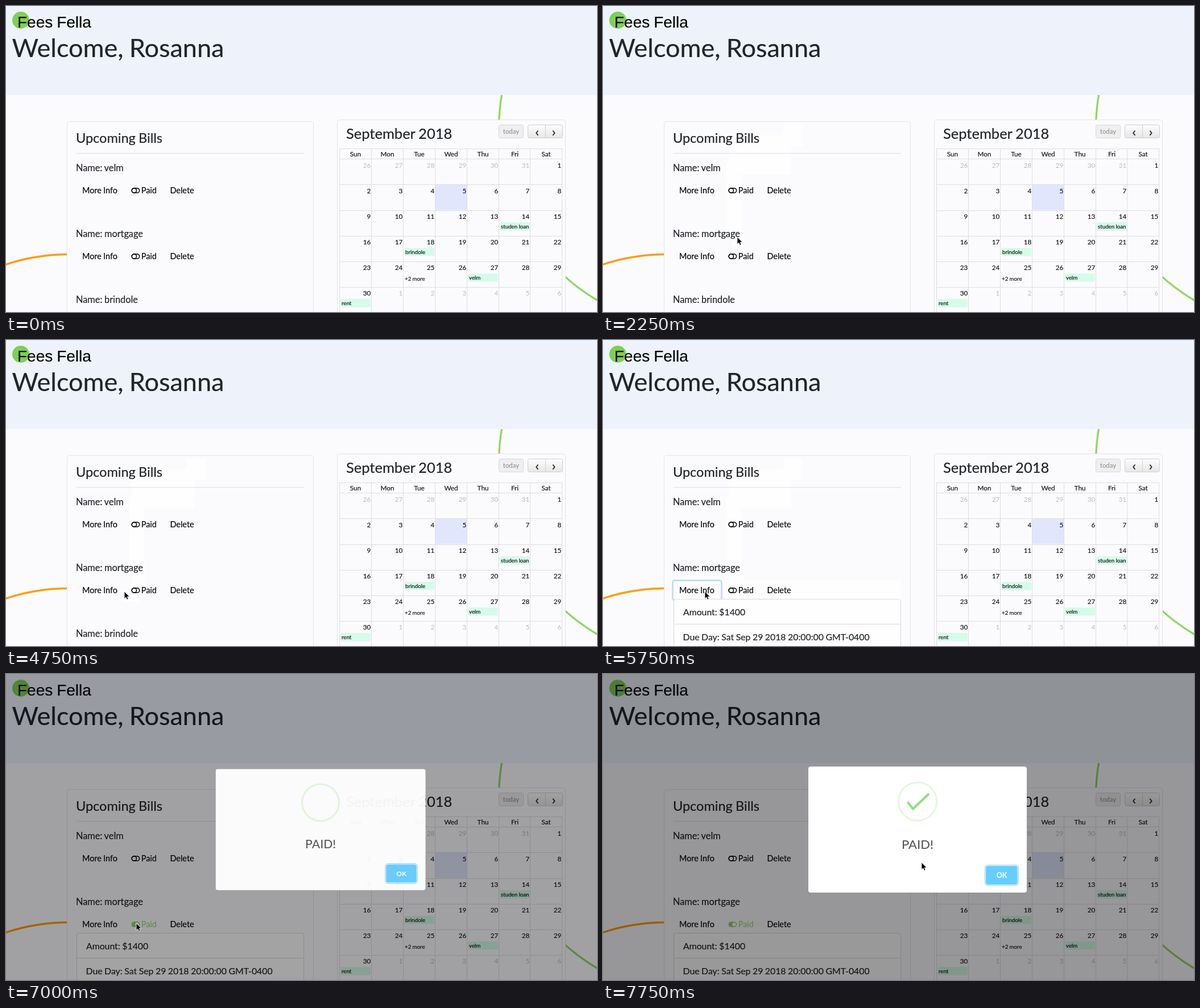
Animation of 1039 by 539 pixels, one loop 8000 ms. Source, as an HTML page:

```html
<!DOCTYPE html>
<html lang="en">
<head>
<meta charset="utf-8">
<title>Bill calendar</title>
<style>
  html, body { margin: 0; width: 100%; height: 100%; overflow: hidden; background: #fbfbfe; }
  svg { display: block; width: 1039px; height: 539px; }
  text { font-family: Lato, sans-serif; fill: #212529; stroke: #212529; stroke-width: .2; word-spacing: -.03em; }
  .brand { font: 28px "Liberation Sans", Arial, sans-serif; fill: #000; }
  .h1 { font-size: 45px; }
  .h2 { font-size: 23.5px; }
  .name { font-size: 16.3px; }
  .item { font-size: 15.8px; }
  .btn { font-size: 14.4px; fill: #000; }
  .title { font-size: 25.5px; }
  .head { font-size: 11.7px; fill: #111; text-anchor: middle; }
  .date { font-size: 11.7px; fill: #111; text-anchor: end; }
  .event { font-size: 9.75px; fill: #111; }
  .today { font-size: 11.4px; fill: #888; text-anchor: middle; }
  .paid { font-size: 22px; font-weight: 500; fill: #595959; text-anchor: middle; }
  .ok { font-size: 12.5px; font-weight: 700; fill: #fff; text-anchor: middle; }
  .other { fill: #bbb; }
  .other, .today, .paid, .ok, .on text { stroke: none; }
  .card { fill: #fbfbfe; stroke: #e4e4e7; }
  .line { fill: none; stroke: #dedee1; }
  .arc { fill: none; stroke-width: 3.3; }
  .on, .on text { fill: #8fd75f; }

  #cursor, #shade, #modal { animation: 8s step-end infinite; }
  #cursor { animation-name: move; }
  #shade { animation-name: shade; }
  #modal { animation-name: pop; transform-origin: 553.5px 274.3px; }

  @keyframes move {
    0% { transform: translate(339px, 212px); visibility: hidden; }
    6.25% { transform: translate(339px, 212px); visibility: visible; }
    9.375% { transform: translate(320px, 230px); }
    12.5% { transform: translate(223px, 280px); }
    15.625% { transform: translate(219px, 300px); }
    18.75% { transform: translate(231px, 397px); }
    28.125% { transform: translate(236px, 407px); }
    40.625% { transform: translate(225px, 434px); }
    43.75% { transform: translate(223px, 442px); }
    59.375% { transform: translate(208px, 443px); }
    62.5% { transform: translate(175px, 443px); }
    65.625% { transform: translate(173px, 442px); }
    71.875% { transform: translate(179px, 443px); }
    75% { transform: translate(230px, 439px); }
    81.25% { transform: translate(229px, 439px); }
    93.75% { transform: translate(554px, 329px); }
    96.875%, 100% { transform: translate(560px, 332px); visibility: visible; }
  }
  @keyframes shade {
    0% { opacity: 0; }
    87.5% { opacity: .36; }
    90.625%, 100% { opacity: .4; }
  }
  @keyframes pop {
    0% { visibility: hidden; }
    87.5% { visibility: visible; opacity: .955; transform: scale(.961); }
    90.625%, 100% { visibility: visible; opacity: 1; transform: none; }
  }
</style>
</head>
<body>
<svg viewBox="0 0 1039 539">
  <rect width="1039" height="539" fill="#fbfbfe"/>
  <circle class="arc" cx="1217" cy="216" r="350.5" stroke="#8fd75f"/>
  <circle class="arc" cx="110" cy="788" r="350.5" stroke="#ff9c0a"/>
  <rect width="1039" height="157" fill="#edf2fb"/>
  <circle cx="26" cy="25" r="15" fill="#7fd053"/>
  <text class="brand" x="20" y="38">Fees Fella</text>
  <text class="h1" x="10.5" y="90">Welcome, Rosanna</text>

  <rect class="card" x="107.5" y="203.5" width="433" height="360" rx="4"/>
  <g id="patches" fill="#fefefe"></g>
  <text class="h2" x="123" y="241">Upcoming Bills</text>
  <path class="line" d="M124 259.5H524"/>
  <g id="focus"></g>
  <g id="bills"></g>

  <g id="details">
    <rect x="124.5" y="456.5" width="399" height="120" rx="4" fill="#fefefe" stroke="#d8d8db"/>
    <path d="M124 500.5H524" stroke="#d8d8db"/>
    <text class="item" x="141" y="485">Amount: $1400</text>
    <text class="item" x="140.5" y="529">Due Day: Sat Sep 29 2018 20:00:00 GMT-0400</text>
  </g>
  <rect id="unrolled" x="122" y="536" width="404" height="3" fill="#fefefe"/>

  <rect class="card" x="582.5" y="200.5" width="401" height="360" rx="4"/>
  <text class="title" x="598" y="234">September 2018</text>
  <linearGradient id="face" x2="0" y2="1"><stop stop-color="#fdfdfd"/><stop offset="1" stop-color="#e6e6e6"/></linearGradient>
  <rect x="866.5" y="209.5" width="43" height="23" rx="3" fill="#efeff0" stroke="#d8d8d9"/>
  <text class="today" x="888" y="225">today</text>
  <rect x="917.5" y="209.5" width="61" height="23" rx="3" fill="url(#face)" stroke="#d0d0d0"/>
  <path d="M948.5 210V232" stroke="#d0d0d0"/>
  <path d="M935.5 219.5L932.2 223.7L935.5 228M961.3 219.5L964.6 223.7L961.3 228" fill="none" stroke="#333" stroke-width="1.9"/>
  <g id="calendar"></g>

  <rect id="shade" width="1039" height="539" opacity="0"/>
  <g id="modal">
    <rect x="361" y="163" width="384" height="222" rx="4" fill="#fff"/>
    <circle cx="553" cy="224.5" r="33.7" fill="none" stroke="#e6f7df" stroke-width="3.2"/>
    <g id="tick" fill="none" stroke="#90e07e" stroke-width="4.2"></g>
    <text class="paid" x="553" y="308">PAID!</text>
    <rect x="671.5" y="336.5" width="58.5" height="36" rx="5" fill="#fff" stroke="#a9daf6" stroke-width="1.6"/>
    <rect x="673" y="338" width="55.5" height="33" rx="4" fill="#66cefe"/>
    <text class="ok" x="701" y="359.2">OK</text>
  </g>
  <path id="cursor" d="M0 0V12.5L2.8 9.9L4.8 14.3L7 13.3L5.1 9.1H9Z" stroke="#fff" stroke-width=".8"/>
</svg>
<script>
  const LOOP = 8000;
  const $ = id => document.getElementById(id);
  const sheet = document.querySelector('style').sheet;
  let windows = 0;

  function add(parent, tag, attrs, text = '') {
    const el = document.createElementNS('http://www.w3.org/2000/svg', tag);
    for (const key in attrs) el.setAttribute(key, attrs[key]);
    el.textContent = text;
    return ($(parent) || parent).appendChild(el);
  }
  const label = (parent, cls, x, y, text) => add(parent, 'text', { class: cls, x, y }, text);

  // Keeps an element visible only between two times of the loop.
  function show(el, from, to = LOOP) {
    const name = 'w' + windows++;
    const pct = t => t / LOOP * 100 + '%';
    const off = '{visibility:hidden}';
    const end = to < LOOP ? pct(to) + off : '100%{visibility:visible}';
    const start = from > 0 ? '0%' + off : '';
    sheet.insertRule(`@keyframes ${name}{${start}${pct(from)}{visibility:visible}${end}}`, sheet.cssRules.length);
    el.style.animation = `${name} ${LOOP}ms step-end infinite`;
  }

  // Bills
  function paid(y, on) {
    const g = add('bills', 'g', on ? { class: 'on' } : {});
    if (on) {
      add(g, 'rect', { x: 220.5, y: y - 4.8, width: 14.8, height: 9.6, rx: 4.8 });
      add(g, 'circle', { cx: 230.6, cy: y, r: 3.3, fill: '#fbfbfe' });
    } else {
      const ring = { fill: 'none', stroke: '#000', 'stroke-width': 1.5 };
      add(g, 'rect', { x: 221.2, y: y - 4.1, width: 13.4, height: 8.2, rx: 4.1, ...ring });
      add(g, 'circle', { cx: 225.3, cy: y, r: 4.1, ...ring });
    }
    label(g, 'btn', 237.8, y + 5, 'Paid');
    return g;
  }
  ['velm', 'mortgage', 'brindole'].forEach((name, i) => {
    const y = 291 + 116 * i;
    label('bills', 'name', 123, y, 'Name: ' + name);
    if (i === 2) return;
    label('bills', 'btn', 134, y + 39, 'More Info');
    label('bills', 'btn', 288.5, y + 39, 'Delete');
    const off = paid(y + 34, false);
    if (i === 1) {
      show(off, 0, 7000);
      show(paid(y + 34, true), 7000);
    }
  });

  // Button focus
  const ring = (x, width, grow, stroke, from, to) => show(add('focus', 'rect', {
    x: x - grow / 2, y: 425 - grow / 2, width: width + grow, height: 32 + grow,
    rx: 4, fill: '#fefefe', stroke, 'stroke-width': grow
  }), from, to);
  ring(124, 83, 3, '#bfdeff', 5250, 6750);
  ring(124, 83, 1, '#c8dcf5', 6750, 7000);
  ring(209, 67, 1, '#e2ebf8', 6750, 7000);
  show($('details'), 5250);
  show($('unrolled'), 5250, 5500);

  // Brighter areas left behind by the pointer: time, left, top, right, bottom
  [
    [500, 336, 210, 351, 228],
    [750, 317, 209, 351, 247],
    [1000, 221, 228, 331, 297],
    [1250, 216, 278, 237, 317],
    [1500, 216, 298, 243, 412],
    [2250, 228, 395, 247, 424],
    [3250, 222, 404, 247, 451],
    [3500, 220, 431, 236, 459],
    [4750, 205, 441, 234, 461],
    [5000, 172, 441, 219, 461],
    [5250, 121, 422, 524, 539]
  ].forEach(([t, x, y, right, bottom]) =>
    show(add('patches', 'rect', { x, y, width: right - x, height: bottom - y }), t, 7000));

  // Calendar
  const crisp = v => Math.floor(v) + .5;
  const colX = c => crisp(586.5 + 55.9 * c);
  const rowY = r => crisp(269.8 + 45.15 * r);
  add('calendar', 'rect', { x: colX(3), y: rowY(1), width: 56, height: 45, fill: '#e1e6fc' });
  let grid = 'M586.5 251.5H978';
  for (let i = 0; i < 8; i++) grid += `M${colX(i)} 251V539`;
  for (let r = 0; r < 6; r++) grid += `M586.5 ${rowY(r)}H978`;
  add('calendar', 'path', { class: 'line', d: grid });
  ['Sun', 'Mon', 'Tue', 'Wed', 'Thu', 'Fri', 'Sat'].forEach((day, c) =>
    label('calendar', 'head', colX(c) + 28, 265, day));
  for (let i = 0; i < 42; i++) {
    const n = i - 5;
    const day = n < 1 ? n + 31 : n > 30 ? n - 30 : n;
    label('calendar', n === day ? 'date' : 'date other',
      colX(i % 7 + 1) - 1.2, 284.5 + 45.15 * Math.floor(i / 7), day);
  }
  function event(c, r, text) {
    const x = colX(c), y = 291 + 45 * r;
    add('calendar', 'rect', { x: x + 1.5, y, width: 53, height: 14.5, rx: 2, fill: '#d5fce9' });
    label('calendar', 'event', x + 3.5, y + 10.6, text);
  }
  event(5, 2, 'studen loan');
  event(2, 3, 'brindole');
  event(4, 4, 'velm');
  event(0, 5, 'rent');
  label('calendar', 'event', 701, 483.5, '+2 more');

  // Check mark being drawn
  const stroke = (d, from, to) => show(add('tick', 'path', { d }), from, to);
  const sweep = add('tick', 'path', { d: 'M522 211A33.7 33.7 0 0 1 573 197', 'stroke-width': 3.2 });
  show(sweep, 7250, 7500);
  stroke('M521.5 210.5L544 233', 7250, 7500);
  stroke('M536.5 227L545 237.5L573 211', 7500, 7750);
  stroke('M535.5 225.5L545 237.5L573 211', 7750);
</script>
</body>
</html>
```
